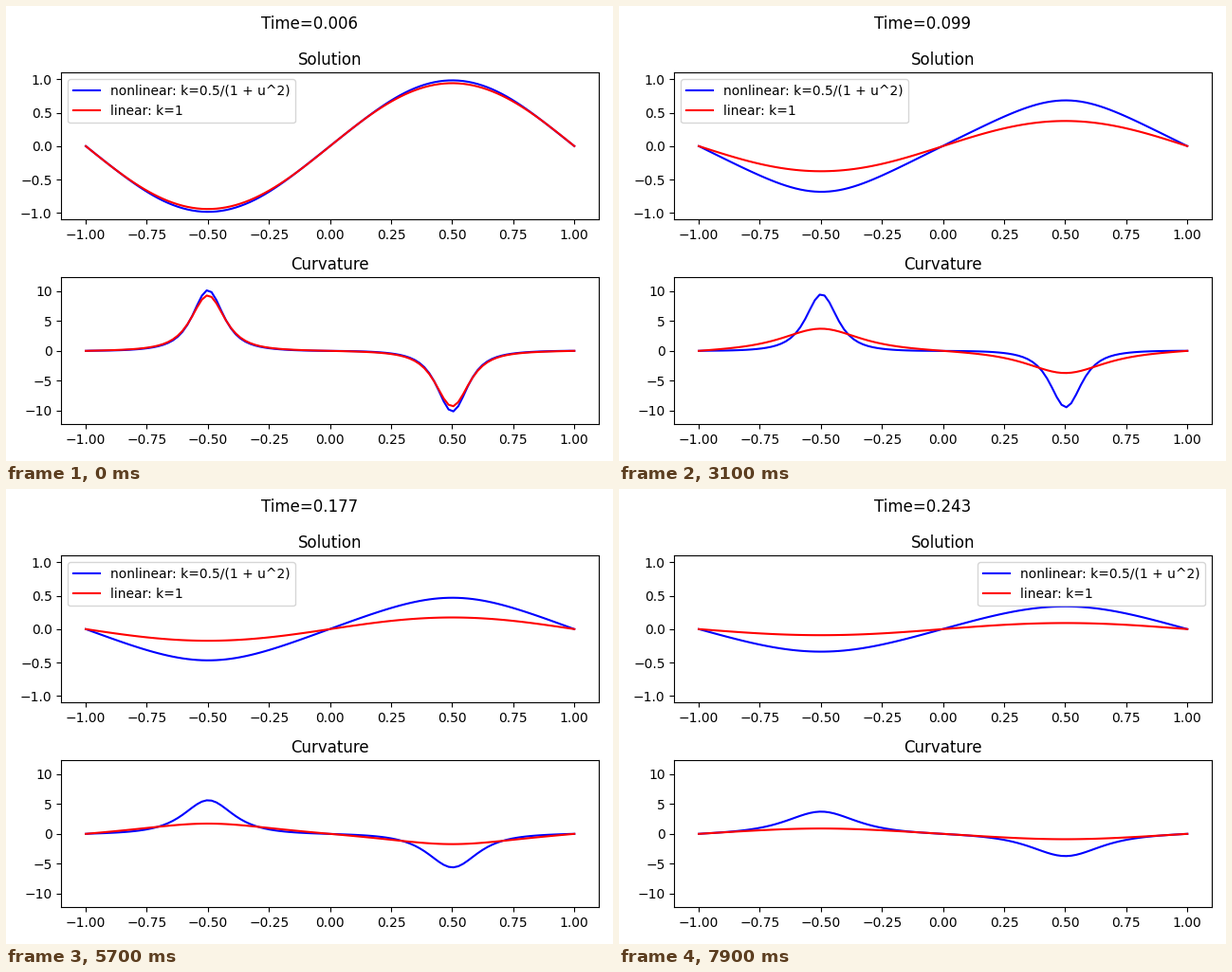
Recreate the animation shown at these times as a matplotlib script. Size 640x480 px, loop 8 s.

```python
import numpy as np
import matplotlib.pyplot as plt
from matplotlib.animation import FuncAnimation

FRAMES = 80
STEPS = 30       # solver steps per frame
DT = 1e-4
T_STEP = STEPS * DT

x = np.linspace(-1, 1, 102)
h = x[1] - x[0]


def k_nonlinear(u):
    return 0.5 / (1 + u**2)


def k_linear(u):
    return np.ones_like(u)


def diffuse(k):
    """Solve u_t = (k(u) u_x)_x with fixed ends, one row per frame."""
    u = np.sin(np.pi * x)
    u[[0, -1]] = 0
    rows = []
    for n in range(1, STEPS * (FRAMES + 1) + 1):
        flux = k(u)[:-1] * np.diff(u) / h
        u[1:-1] += DT * np.diff(flux) / h
        if n % STEPS == 0:
            rows.append(u.copy())
    return rows[1:]


def curvature(u):
    ux = np.gradient(u, h)
    uxx = np.zeros_like(u)
    uxx[1:-1] = np.diff(u, 2) / h**2
    return uxx / (1 + ux**2) ** 1.5


series = [
    (diffuse(k_nonlinear), "b", "nonlinear: k=0.5/(1 + u^2)"),
    (diffuse(k_linear), "r", "linear: k=1"),
]

fig, (top, bottom) = plt.subplots(2, 1, figsize=(6.4, 4.8), dpi=100)
title = fig.suptitle("Time=0.006")
for ax, name, limit in ((top, "Solution", 1.1), (bottom, "Curvature", 12.3)):
    ax.set_title(name)
    ax.set_xlim(-1.1, 1.1)
    ax.set_ylim(-limit, limit)

lines = []
for rows, color, label in series:
    sol, = top.plot(x, rows[0], color, label=label)
    curv, = bottom.plot(x, curvature(rows[0]), color)
    lines.append((rows, sol, curv))
top.legend(loc="best")
fig.tight_layout()


def update(i):
    title.set_text(f"Time={round((i + 2) * T_STEP, 3)}")
    for rows, sol, curv in lines:
        sol.set_ydata(rows[i])
        curv.set_ydata(curvature(rows[i]))


anim = FuncAnimation(fig, update, frames=FRAMES, interval=100,
                     repeat=True, repeat_delay=0, blit=False)
plt.show()
```
